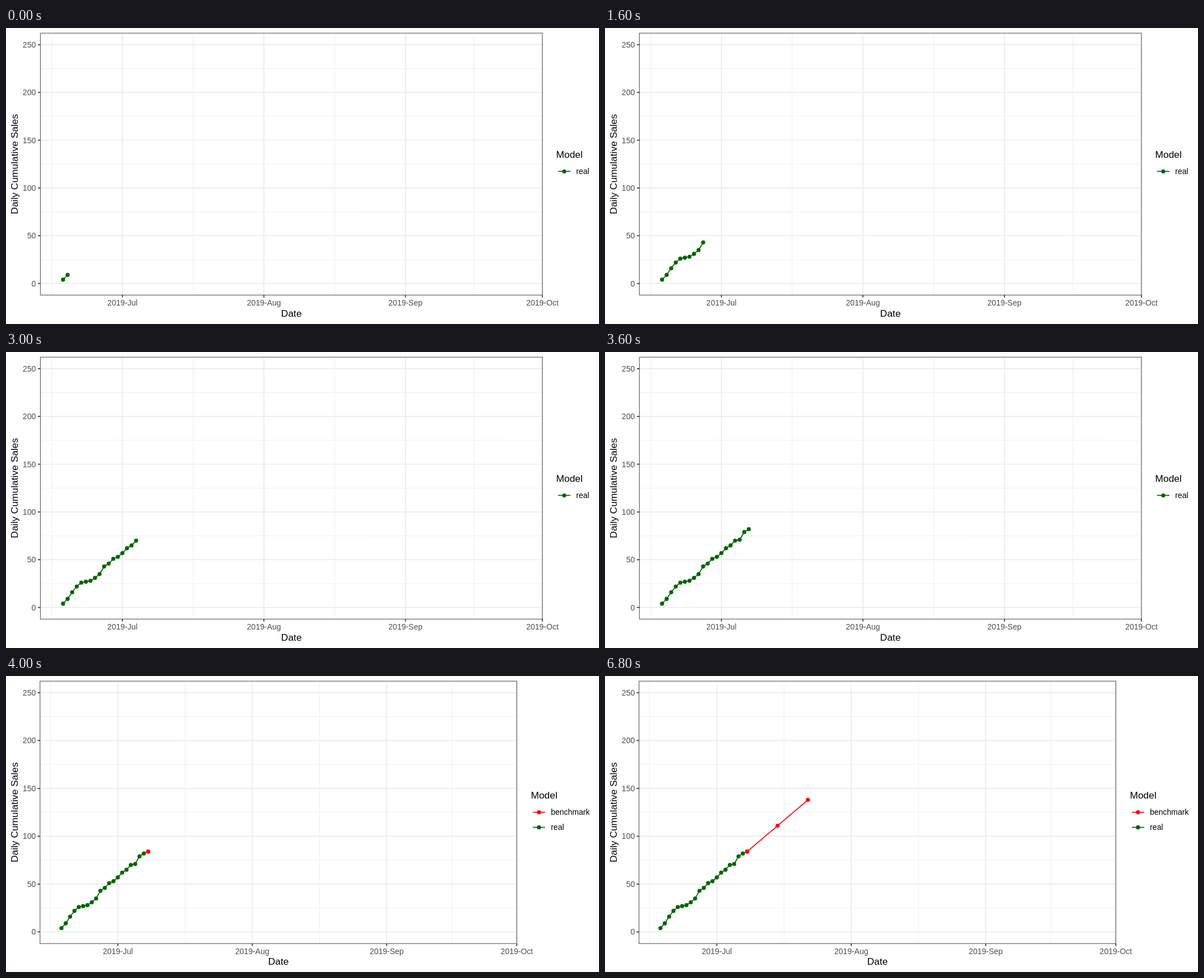
An HTML page with a canvas that plays this animation: 1058x529 px, repeating every 8000 ms.

```html
<!DOCTYPE html>
<html lang="en">
<head>
<meta charset="utf-8">
<title>Daily cumulative sales</title>
<style>
  html, body { margin: 0; width: 100%; height: 100%; overflow: hidden; background: #fff; }
  canvas { display: block; }
</style>
</head>
<body>
<canvas id="stage" width="1058" height="529"></canvas>
<script>
const ctx = document.getElementById('stage').getContext('2d');
const LOOP = 8000;
const GREEN = '#006400', RED = '#ff0000', GRID = '#ebebeb', AXIS = '#333', LABEL = '#4d4d4d';

// Days count from 1 July; sales are cumulative, one value per day from 18 June.
const FIRST_DAY = -13;
const sales = [4, 9, 16, 22, 26, 27, 28, 31, 35, 43, 46, 51, 53, 57, 62, 65, 70, 71, 79, 82, 84];
const real = sales.map((value, i) => [FIRST_DAY + i, value]);
const benchmark = [[7, 84], [14, 111], [21, 138]];
const months = [[0, '2019-Jul'], [31, '2019-Aug'], [62, '2019-Sep'], [92, '2019-Oct']];
const midMonths = [-15.5, 15.5, 46.5, 77];

const early = { left: 61.4, right: 957, bottom: 477.3, july: 207.7, zero: 456.6, legend: 982.3, shift: 0 };
const late = { left: 60.7, right: 957, bottom: 478.2, july: 207.2, zero: 457.4, legend: 982.3, shift: 0.6 };
const wide = { ...late, right: 911.4, july: 199.5, legend: 937.2 };
const TOP = 9.2, Y250 = 29.8;

function path(points, color, width) {
  ctx.beginPath();
  points.forEach(([x, y]) => ctx.lineTo(x, y));
  ctx.strokeStyle = color;
  ctx.lineWidth = width;
  ctx.stroke();
}

function dot([x, y], color) {
  ctx.beginPath();
  ctx.arc(x, y, 3.65, 0, 2 * Math.PI);
  ctx.fillStyle = color;
  ctx.fill();
}

function text(str, x, y, size, color, align = 'left') {
  ctx.font = `${size}px "Liberation Sans", Arial, sans-serif`;
  ctx.textAlign = align;
  ctx.fillStyle = color;
  ctx.fillText(str, x, y);
}

function drawAxes(p, x, y) {
  const vertical = (day, width) => path([[x(day), TOP], [x(day), p.bottom]], GRID, width);
  const horizontal = (value, width) => path([[p.left, y(value)], [p.right, y(value)]], GRID, width);
  midMonths.forEach(day => vertical(day, 0.85));
  for (let v = 25; v < 250; v += 50) horizontal(v, 0.85);
  months.forEach(([day]) => vertical(day, 1.7));
  for (let v = 0; v <= 250; v += 50) horizontal(v, 1.7);
}

function drawFrame(p, x, y) {
  ctx.strokeStyle = '#555';
  ctx.lineWidth = 1.1;
  ctx.strokeRect(p.left, TOP, p.right - p.left, p.bottom - TOP);
  for (const [day, name] of months) {
    path([[x(day), p.bottom], [x(day), p.bottom + 4.4]], AXIS, 1.7);
    text(name, x(day), 496.3 + p.shift, 14, LABEL, 'center');
  }
  for (let v = 0; v <= 250; v += 50) {
    path([[p.left - 4.4, y(v)], [p.left, y(v)]], AXIS, 1.7);
    text(v, 53.2, y(v) + 5, 14, LABEL, 'right');
  }
  text('Date', (p.left + p.right) / 2, 515.6 + p.shift, 17.4, '#000', 'center');
  ctx.save();
  ctx.translate(20.8, (TOP + p.bottom) / 2);
  ctx.rotate(-Math.PI / 2);
  text('Daily Cumulative Sales', 0, 0, 17.4, '#000', 'center');
  ctx.restore();
}

function drawLegend(p, entries) {
  const top = 242.6 + p.shift - 13.4 * (entries.length - 1);
  text('Model', p.legend - 0.8, top - 11, 17.4, '#000');
  entries.forEach(([name, color], i) => {
    const cx = p.legend + 13.7, cy = top + 13.7 + 27 * i;
    path([[cx - 11, cy], [cx + 11, cy]], color, 1.7);
    dot([cx, cy], color);
    text(name, p.legend + 35, cy + 4.9, 14, '#000');
  });
}

function draw(t) {
  const forecasting = t >= 4000;
  const p = forecasting ? wide : t >= 3800 ? late : early;
  const x = day => p.july + day * (p.right - p.july) / 92;
  const y = value => p.zero - value * (p.zero - Y250) / 250;

  const series = [{ color: GREEN, data: real.slice(0, 2 + Math.floor(t / 200)) }];
  const entries = [['real', GREEN]];
  if (forecasting) {
    series.push({ color: RED, data: benchmark.slice(0, 1 + Math.floor((t - 4000) / 1400)) });
    entries.unshift(['benchmark', RED]);
  }

  ctx.fillStyle = '#fff';
  ctx.fillRect(0, 0, 1058, 529);
  drawAxes(p, x, y);
  for (const s of series) s.points = s.data.map(([day, value]) => [x(day), y(value)]);
  for (const s of series) path(s.points, s.color, 1.7);
  for (const s of series) s.points.forEach(point => dot(point, s.color));
  drawFrame(p, x, y);
  drawLegend(p, entries);
}

const start = performance.now();
function tick() {
  draw((performance.now() - start) % LOOP);
  requestAnimationFrame(tick);
}
tick();
</script>
</body>
</html>
```
